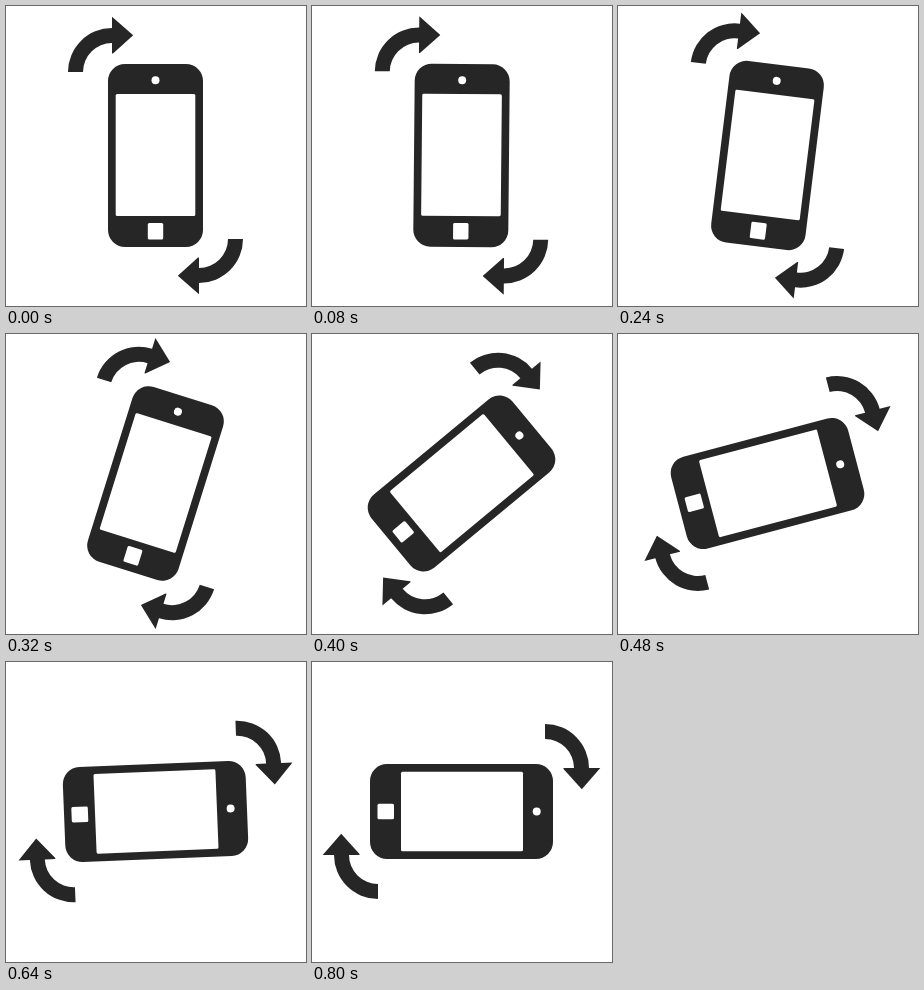
Write an HTML page with a canvas that moves like this. It is 300 by 300 pixels and loops after 1080 ms.

```html
<!DOCTYPE html>
<html lang="en">
<head>
<meta charset="utf-8">
<title>Rotate phone</title>
<style>
  html, body { margin: 0; width: 100%; height: 100%; overflow: hidden; background: #fff; }
  canvas { display: block; width: 300px; height: 300px; }
</style>
</head>
<body>
<canvas id="stage" width="300" height="300"></canvas>
<script>
const ctx = document.getElementById('stage').getContext('2d');
const INK = '#262626', PAPER = '#fff';
const LOOP = 1080, TURN = 800, STEP = 40, CENTER = 149.5;

// Cubic Bezier easing through (0,0), (x1,0), (x2,1), (1,1)
function ease(x, x1 = 0.8, x2 = 0.17) {
  if (x <= 0 || x >= 1) return x <= 0 ? 0 : 1;
  let lo = 0, hi = 1;
  for (let i = 0; i < 30; i++) {
    const s = (lo + hi) / 2, r = 1 - s;
    if (3 * x1 * s * r * r + 3 * x2 * s * s * r + s * s * s < x) lo = s;
    else hi = s;
  }
  return lo * lo * (3 - 2 * lo);
}

function box(x, y, w, h, r, color) {
  ctx.fillStyle = color;
  ctx.beginPath();
  ctx.roundRect(x, y, w, h, r);
  ctx.fill();
}

function phone() {
  box(-47.5, -91.5, 95, 183, 17, INK);
  box(-39.8, -61.5, 79.6, 122, 1.5, PAPER);
  box(-7.7, 67.5, 15.4, 16.5, 1.5, PAPER);
  ctx.beginPath();
  ctx.arc(0, -75.2, 4, 0, Math.PI * 2);
  ctx.fill();
}

function arrow() {
  ctx.fillStyle = INK;
  ctx.beginPath();
  ctx.moveTo(-87.5, -83.5);
  ctx.arc(-43.5, -83.5, 44, Math.PI, Math.PI * 1.5);
  ctx.lineTo(-43.5, -138.8);
  ctx.lineTo(-22.3, -120.3);
  ctx.lineTo(-42.5, -102);
  ctx.lineTo(-43.5, -102);
  ctx.lineTo(-43.5, -112.5);
  ctx.arc(-43.5, -83.5, 29, Math.PI * 1.5, Math.PI, true);
  ctx.closePath();
  ctx.fill();
}

function draw(time) {
  const t = Math.floor((time % LOOP) / STEP) * STEP;
  ctx.fillStyle = PAPER;
  ctx.fillRect(0, 0, 300, 300);
  ctx.save();
  ctx.translate(CENTER, CENTER);
  ctx.rotate(ease(t / TURN) * Math.PI / 2);
  phone();
  arrow();
  ctx.rotate(Math.PI);
  arrow();
  ctx.restore();
}

const start = performance.now();
function tick() {
  draw(performance.now() - start);
  requestAnimationFrame(tick);
}
tick();
</script>
</body>
</html>
```
